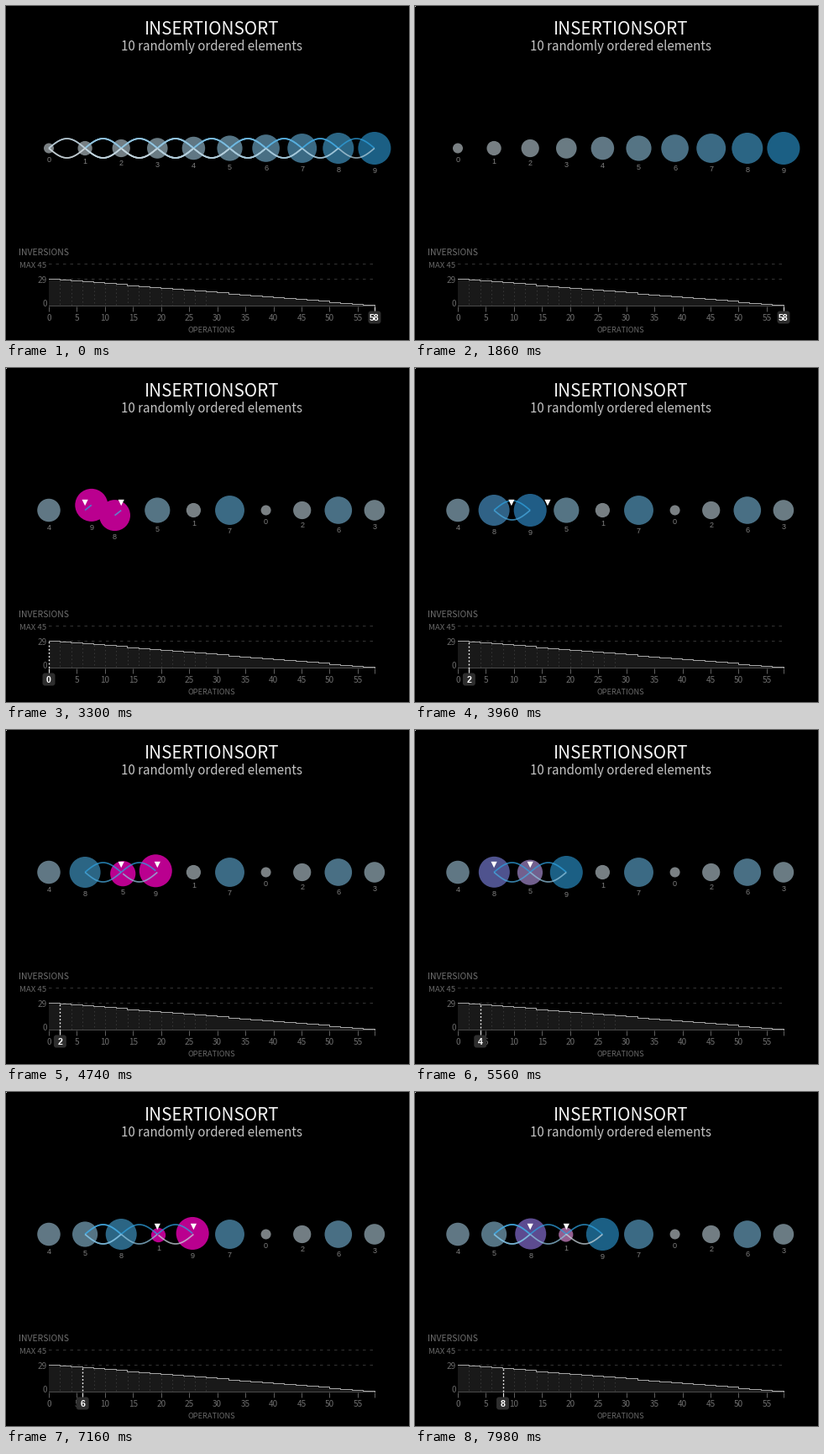
A matplotlib script that plays this animation: 480 px wide and 398 px high, repeating every 8000 ms.

```python
import numpy as np
import matplotlib.pyplot as plt
from matplotlib.animation import FuncAnimation
from matplotlib.collections import LineCollection
from matplotlib.patches import Circle, FancyBboxPatch, Polygon, Rectangle

W, H, DPI = 480, 398, 100
PX = 72 / DPI
STEP, LOOP = 20, 8000

SHUFFLE_AT, HUNT_AT = 1859, 2476
MOVE, CYCLE, SWAP_DELAY = 575, 1200, 620
ROW_Y, ARC = 169.5, 11.5
START = [4, 9, 8, 5, 1, 7, 0, 2, 6, 3]

PALE = np.array([205, 215, 220, 153]) / 255
BLUE = np.array([46, 160, 222, 153]) / 255
HOT = np.array([186, 0, 143, 255]) / 255


def grey(v):
    return (v / 255,) * 3


def ease(t):
    t = min(max(t, 0), 1)
    return 4 * t ** 3 if t < 0.5 else 1 - 4 * (1 - t) ** 3


def crisp(v):
    """Centre of the pixel that holds v."""
    return np.floor(v) + 0.5


def slot_x(i):
    return 51 + 43.1 * i


def op_x(op):
    return 51 + 388 / 58 * op


def inv_y(v):
    return crisp(357.5 - v * 10 / 9)


def radius(n):
    return np.sqrt(36 + 38.3 * n)


def tint(n):
    return PALE + (BLUE - PALE) * (n / 9) ** 1.6


def trail_tint(n):
    return (*tint(n)[:3], 0.75)


def insertion_swaps(order):
    """Left index of every swap, and the order before each of them."""
    order, swaps, orders = list(order), [], []
    for i in range(1, len(order)):
        j = i - 1
        while j >= 0 and order[j] > order[j + 1]:
            swaps.append(j)
            orders.append(list(order))
            order[j], order[j + 1] = order[j + 1], order[j]
            j -= 1
    return swaps, orders


SWAPS, ORDERS = insertion_swaps(START)


def arc(i, direction, p):
    """Half wave leaving slot i: rightwards above, leftwards below the row."""
    p = np.asarray(p)
    return slot_x(i + direction * p), ROW_Y - direction * ARC * np.sin(np.pi * p)


def swap_trails(k, p=1.0):
    j, order = SWAPS[k], ORDERS[k]
    steps = np.linspace(0, p, 18)
    for n, i, direction in ((order[j], j, 1), (order[j + 1], j + 1, -1)):
        yield np.column_stack(arc(i, direction, steps)), trail_tint(n)


fig = plt.figure(figsize=(W / DPI, H / DPI), dpi=DPI, facecolor="black")
ax = fig.add_axes([0, 0, 1, 1])
ax.set_xlim(0, W)
ax.set_ylim(H, 0)
ax.axis("off")


def label(x, y, s, size, shade, ha="center", font="Noto Sans CJK JP", **kw):
    return ax.text(x, y, s, fontsize=size * PX, color=grey(shade), ha=ha,
                   va="baseline", family=font, **kw)


def rule(xs, ys, shade, width=1.0, z=2, **kw):
    return ax.plot(xs, ys, color=grey(shade), lw=width * PX, zorder=z,
                   solid_capstyle="butt", **kw)[0]


# Headings
label(244.7, 34.3, "INSERTIONSORT", 20.6, 245, weight="light")
label(244.7, 53, "10 randomly ordered elements", 15.05, 195, weight="light")

# Inversions chart
label(15, 297.3, "INVERSIONS", 10.4, 112, "left")
label(48.5, 311.5, "MAX 45", 9.6, 105, "right")
label(49, 329.5, "29", 10, 105, "right")
label(49, 358, "0", 10, 105, "right")
label(244.5, 389, "OPERATIONS", 9.3, 105)

for level in (45, 29):
    rule([51, 439], [inv_y(level)] * 2, 52, dashes=(3.5, 5), snap=False)
ops = np.arange(0, 59, 2)
heights = inv_y(29 - ops / 2)
ax.fill_between(op_x(ops), heights, inv_y(0), step="post",
                color=grey(25), lw=0, zorder=1)
for op in ops[1:15]:
    rule([op_x(op)] * 2, [inv_y(29 - op / 2), 357], 55, dashes=(1.5, 3))
rule([51, 439], [inv_y(0)] * 2, 75, snap=False)
ax.step(crisp(op_x(ops)), heights, where="post", color=grey(165), lw=PX,
        zorder=3, snap=False)
for op in list(range(0, 60, 5)) + [58]:
    rule([op_x(op)] * 2, [358, 364], 95)
    if op != 58:
        label(op_x(op), 375.3, str(op), 10, 110)

# Current operation
cursor = rule([0, 0], [0, 0], 255, 1.4, z=5, dashes=(1.2, 1.8))
cursor_tick = rule([0, 0], [358, 364], 225, 1.2, z=5)
badge = FancyBboxPatch((0, 363.5), 15, 15, fc=grey(46), lw=0, zorder=6,
                       boxstyle="round,pad=0,rounding_size=3")
ax.add_patch(badge)
badge_text = label(0, 375.2, "", 10.5, 255, font="Liberation Sans",
                   weight="bold", zorder=7)

# Elements, larger ones below
balls, names = {}, {}
for n in range(9, -1, -1):
    balls[n] = ax.add_patch(Circle((0, ROW_Y), radius(n), lw=0, zorder=10))
    names[n] = label(0, 0, str(n), 9, 128, font="Liberation Sans", zorder=11)

trails = LineCollection([], linewidths=1.7 * PX, zorder=12)
ax.add_collection(trails)
TIP = np.array([[-3.6, 156.8], [3.6, 156.8], [0, 164.2]])
markers = [ax.add_patch(Polygon(TIP, fc="white", lw=0, zorder=13))
           for _ in range(2)]
corner = ax.add_patch(Rectangle((0, 0), 1, 1, fc=grey(220), lw=0))


def place(n, x, y=ROW_Y, heat=0.0):
    balls[n].center = x, y
    balls[n].set_facecolor(tint(n) + (HOT - tint(n)) * heat)
    names[n].set_position((x, y + radius(n) + 10.2))


def show_op(op):
    x = op_x(op)
    cursor.set_data([x, x], [inv_y(29 - op / 2), 358])
    cursor_tick.set_xdata([x, x])
    badge.set_x(x - 7.5)
    badge_text.set_x(x)
    badge_text.set_text(str(op))


def show_trails(parts):
    trails.set_segments([seg for seg, _ in parts])
    trails.set_color([color for _, color in parts])


def show_shuffle(ms):
    p = ease((ms - SHUFFLE_AT) / MOVE)
    for i, n in enumerate(START):
        place(n, slot_x(n + (i - n) * p))
    show_op(0 if p >= 1 else 58)
    past = range(len(SWAPS)) if ms < SHUFFLE_AT else []
    show_trails([part for k in past for part in swap_trails(k)])


def show_sort(ms):
    k, local = divmod(ms - HUNT_AT, CYCLE)
    j, order = SWAPS[k], ORDERS[k]
    hop = ease(local / MOVE)
    p = ease((local - SWAP_DELAY) / MOVE)

    heat = {}
    if k:
        cooling = max(0, 1 - local / 300)
        i = SWAPS[k - 1]
        heat = dict.fromkeys(order[i:i + 2], cooling)
    if local > SWAP_DELAY:
        warming = min(1, (local - SWAP_DELAY) / 200)
        heat.update(dict.fromkeys(order[j:j + 2], warming))

    for i, n in enumerate(order):
        direction = {j: 1, j + 1: -1}.get(i)
        x, y = arc(i, direction, p) if direction else (slot_x(i), ROW_Y)
        place(n, float(x), float(y), heat.get(n, 0))

    parts = [part for m in range(k) for part in swap_trails(m)]
    if p > 0:
        parts += swap_trails(k, p)
    show_trails(parts)
    show_op(2 * (k + (p >= 1)))

    before = SWAPS[k - 1] if k else -1
    x = slot_x(before + (j - before) * hop)
    for i, marker in enumerate(markers):
        marker.set_xy(TIP + [x + 43.1 * i, 0])
        marker.set_alpha(1 if k else min(1, local / 200))


def draw(frame):
    ms = frame * STEP
    sorting = ms >= HUNT_AT
    for marker in markers:
        marker.set_visible(sorting)
    corner.set_visible(ms >= 1200)
    if sorting:
        show_sort(ms)
    else:
        show_shuffle(ms)
    return []


anim = FuncAnimation(fig, draw, frames=LOOP // STEP, interval=STEP,
                     init_func=lambda: draw(0), repeat=True, repeat_delay=0)
plt.show()
```
